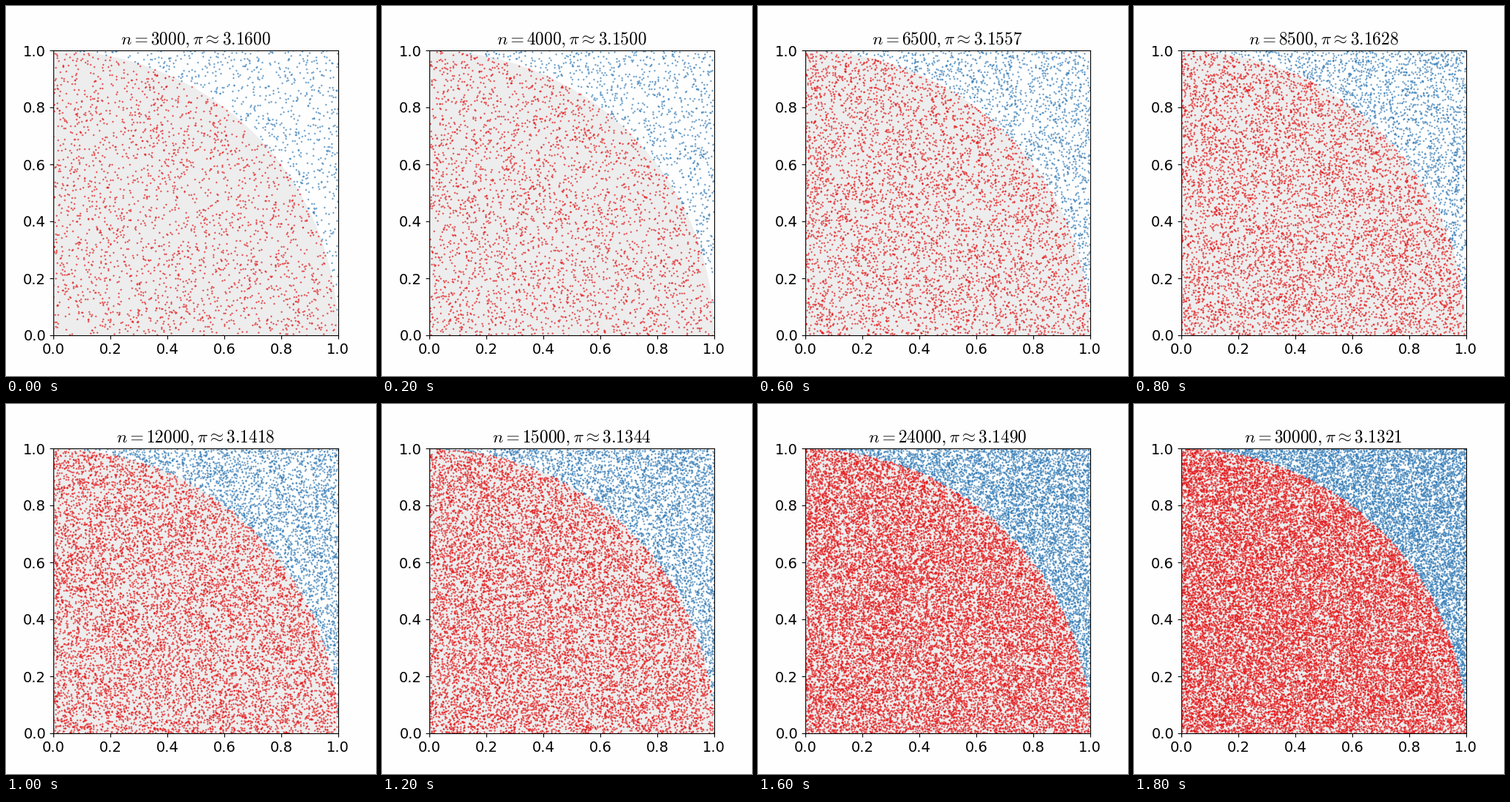
These frames come from a looping animation (500 px wide and 500 px high, 2 s). A matplotlib script:

```python
import numpy as np
import matplotlib.pyplot as plt
from matplotlib.animation import FuncAnimation
from matplotlib.patches import Wedge

PAPER = "#fefefe"
RED, BLUE, GREY = "#e41a1c", "#377eb8", "#ededed"

plt.rcParams.update({
    "font.family": "DejaVu Sans",
    "font.size": 14,
    "mathtext.fontset": "cm",
    "figure.facecolor": PAPER,
    "axes.facecolor": PAPER,
})

# Estimate of pi reached by each run
ESTIMATES = [3.1600, 3.1500, 3.1880, 3.1557, 3.1628,
             3.1418, 3.1344, 3.1442, 3.1490, 3.1321]


def sample_size(run):
    """Tenfold geometric growth, rounded to a coarser step when large."""
    n = 3000 * 10 ** (run / (len(ESTIMATES) - 1))
    step = 500 if n < 10000 else 3000
    return step * round(n / step)


def sample(run, n):
    """Uniform points in the unit square, split by the quarter circle."""
    hits = round(n * ESTIMATES[run] / 4)
    pts = np.random.default_rng(run).random((2, 2 * n))
    inside = np.hypot(*pts) < 1
    return pts[:, inside][:, :hits], pts[:, ~inside][:, :n - hits]


fig, ax = plt.subplots(figsize=(5, 5), dpi=100)
ax.set(aspect="equal", xlim=(0, 1), ylim=(0, 1),
       xticks=np.linspace(0, 1, 6), yticks=np.linspace(0, 1, 6))
ax.add_patch(Wedge((0, 0), 1, 0, 90, facecolor=GREY, edgecolor="none"))

dots_in, = ax.plot([], [], ".", ms=1, color=RED)
dots_out, = ax.plot([], [], ".", ms=1, color=BLUE)
title = ax.set_title("")


def draw(run):
    n = sample_size(run)
    inner, outer = sample(run, n)
    dots_in.set_data(*inner)
    dots_out.set_data(*outer)
    title.set_text(rf"$n = {n}, \pi\approx {ESTIMATES[run]:.4f}$")
    return dots_in, dots_out, title


anim = FuncAnimation(fig, draw, frames=len(ESTIMATES), interval=200,
                     repeat=True)
plt.show()
```
